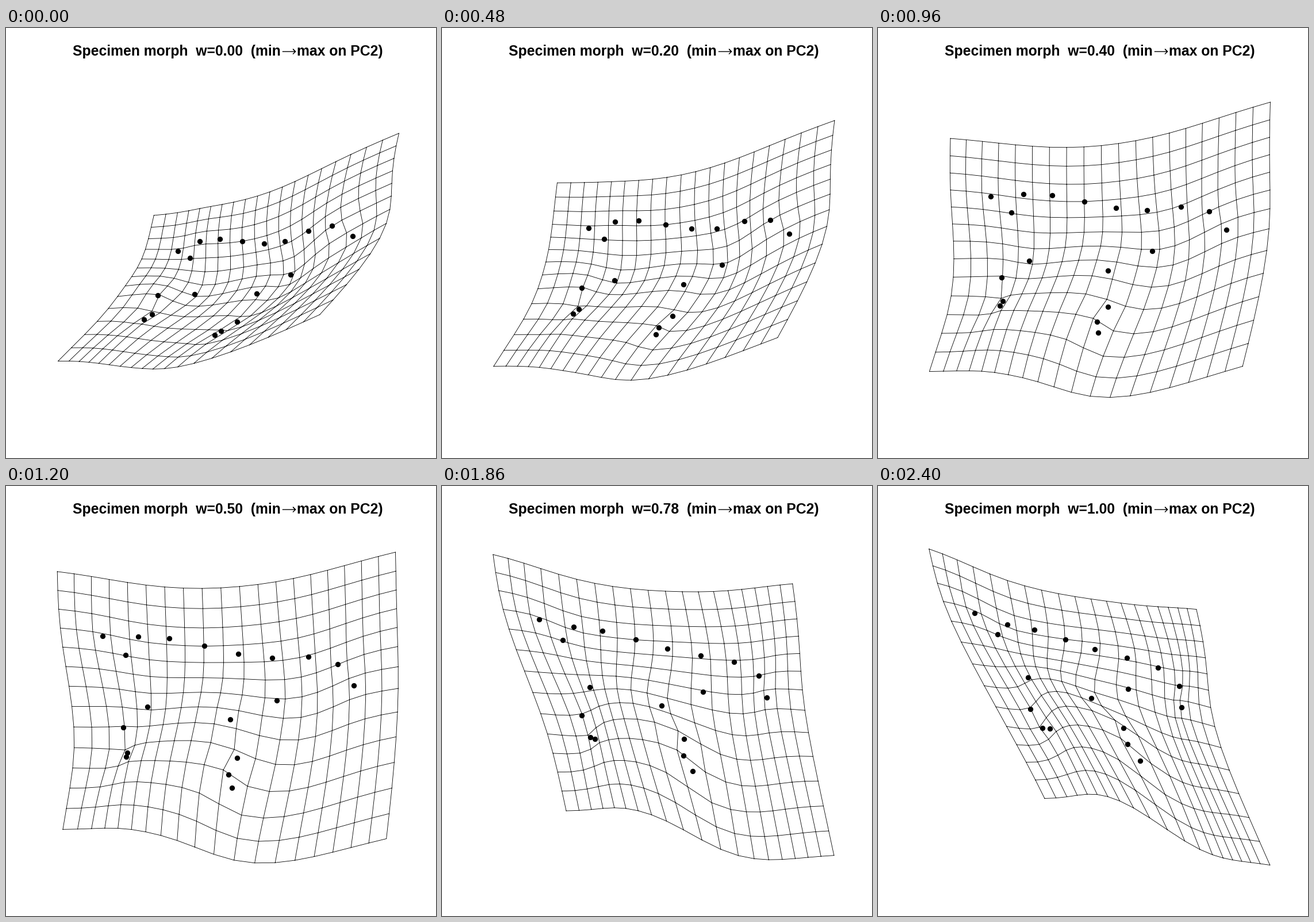
A matplotlib script for the animation above (2.46 s loop, 748 by 748 pixels).

```python
import numpy as np
import matplotlib.pyplot as plt
from matplotlib.animation import FuncAnimation

SIZE = 748
DPI = 100
PX = 72 / DPI
STEPS = 41
COLS, ROWS = 20, 14
END_SCALE = 0.9      # shape size at w=1 relative to w=0
GRID_WIDTH = 593     # the grid always fills this width

plt.rcParams["path.simplify"] = False

# Landmarks that pull the grid: cell (u, v) at rest, x, y at w=0, x, y at w=1
LANDMARKS = np.array([
    (2.71, 3.05, 299, 387, 168, 220),
    (4.50, 2.70, 337, 370, 225, 240),
    (8.05, 3.00, 411, 370, 326, 266),
    (11.40, 3.87, 485, 370, 433, 298),
    (15.45, 5.03, 567, 343, 524, 347),
    (16.29, 6.35, 603, 361, 528, 385),
    (11.60, 6.05, 495, 428, 435, 352),
    (9.75, 7.70, 436, 461, 371, 369),
    (10.30, 9.37, 402, 510, 427, 421),
    (10.18, 10.00, 374, 526, 434, 449),
    (10.43, 10.29, 363, 533, 456, 478),
    (4.83, 6.83, 328, 462, 261, 332),
    (2.95, 8.00, 264, 464, 265, 388),
    (3.15, 9.17, 254, 497, 286, 421),
    (3.25, 9.43, 240, 506, 299, 422),
])
# Landmarks that simply ride on the grid
RIDERS = np.array([(3.70, 3.95), (6.15, 2.65), (9.72, 3.50), (13.55, 4.08)])

# Key points of the border: top edge, bottom edge, middle of both sides
BORDER_UV = np.array([(u, v) for v in (0, 13) for u in (0, 6, 13, 19)]
                     + [(0, 7), (19, 7)], float)
BORDER = np.array([
    (257, 325, 89, 109), (376, 306, 255, 173),
    (526, 255, 446, 206), (684, 182, 554, 214),
    (90, 579, 290, 543), (198, 588, 400, 540),
    (358, 574, 582, 641), (546, 498, 682, 659),
    (207, 448, 185, 347), (662, 339, 586, 418),
])


def kernel(p, q):
    r2 = ((p[:, None] - q) ** 2).sum(-1)
    return r2 * np.log(r2 + 1e-12)


def affine(p):
    return np.column_stack([np.ones(len(p)), p])


def warp(points, ctrl, values, ridge):
    """Thin-plate spline through ctrl -> values, evaluated at points."""
    n = len(ctrl)
    system = np.zeros((n + 3, n + 3))
    system[:n, :n] = kernel(ctrl, ctrl) + np.eye(n) * ridge
    system[:n, n:] = affine(ctrl)
    system[n:, :n] = affine(ctrl).T
    coef = np.linalg.solve(system, np.vstack([values, np.zeros((3, values.shape[1]))]))
    return np.hstack([kernel(points, ctrl), affine(points)]) @ coef


def refine(rest, shape):
    """Nudge the rest landmarks so that their spline also meets the border."""
    base = rest.ravel()

    def errors(p):
        miss = warp(BORDER_UV, p.reshape(-1, 2), shape, 0.03) - BORDER
        return np.concatenate([miss.ravel() / 2, (p - base) / 0.1])

    p, damp = base.copy(), 50.0
    for _ in range(15):
        e = errors(p)
        jac = np.column_stack([(errors(p + d) - e) / 1e-4 for d in 1e-4 * np.eye(p.size)])
        step = np.linalg.solve(jac.T @ jac + damp * np.eye(p.size), -jac.T @ e)
        trial = errors(p + step)
        if trial @ trial < e @ e:
            p, damp = p + step, damp / 5
        else:
            damp *= 10
    return p.reshape(-1, 2)


pulled = LANDMARKS[:, 2:]
ctrl = np.vstack([refine(LANDMARKS[:, :2], pulled), BORDER_UV])
ridge = np.r_[np.full(len(pulled), 0.03), np.full(len(BORDER), 1.0)]


def poses(cells):
    """Positions of cells at w=0 and w=1, as x0, y0, x1, y1."""
    return warp(cells, ctrl, np.vstack([pulled, BORDER]), ridge)


u, v = np.meshgrid(np.arange(COLS), np.arange(ROWS))
nodes = poses(np.column_stack([u.ravel(), v.ravel()]).astype(float))
dots = np.vstack([pulled, poses(RIDERS)])

fig = plt.figure(figsize=(SIZE / 100, SIZE / 100), dpi=DPI, facecolor="white")
ax = fig.add_axes([0, 0, 1, 1])
ax.set_xlim(-0.5, SIZE - 0.5)
ax.set_ylim(SIZE - 0.5, -0.5)
ax.axis("off")

mesh, = ax.plot([], [], color="black", lw=0.85 * PX)
marks, = ax.plot([], [], "o", color="black", ms=9.3 * PX, mew=0, snap=False)


def label(x, text, ha="left"):
    return ax.text(x, 47.5, text, ha=ha, va="baseline", color="black",
                   family="Liberation Sans", weight="bold", size=24.8 * PX)


title = label(116, "")
label(655.5, "max on PC2)", ha="right")
ax.plot([481, 503, 499, 503, 499], [40.5, 40.5, 36.5, 40.5, 44.5],
        color="black", lw=1.4 * PX)


def blend(pair, w):
    return (1 - w) * pair[:, :2] + w * END_SCALE * pair[:, 2:]


def strokes(lines):
    """Join separate lines into one path with gaps."""
    gaps = np.full((len(lines), 1, 2), np.nan)
    return np.concatenate([lines, gaps], axis=1).reshape(-1, 2)


def draw(i):
    w = i / (STEPS - 1)
    grid = blend(nodes, w)
    low, high = grid.min(0), grid.max(0)
    scale = GRID_WIDTH / (high[0] - low[0])
    drift = (1 - w) ** 2
    centre = np.array([384.8 + 1.7 * drift, 384 + 3.7 * drift])

    def place(p):
        return (p - (low + high) / 2) * scale + centre

    net = place(grid).reshape(ROWS, COLS, 2)
    mesh.set_data(*np.vstack([strokes(net), strokes(net.transpose(1, 0, 2))]).T)
    marks.set_data(*place(blend(dots, w)).T)
    title.set_text(f"Specimen morph  w={w:.2f}  (min")
    return mesh, marks, title


anim = FuncAnimation(fig, draw, frames=STEPS, init_func=lambda: draw(0),
                     interval=60, repeat=True, repeat_delay=0, blit=False)
plt.show()
```
